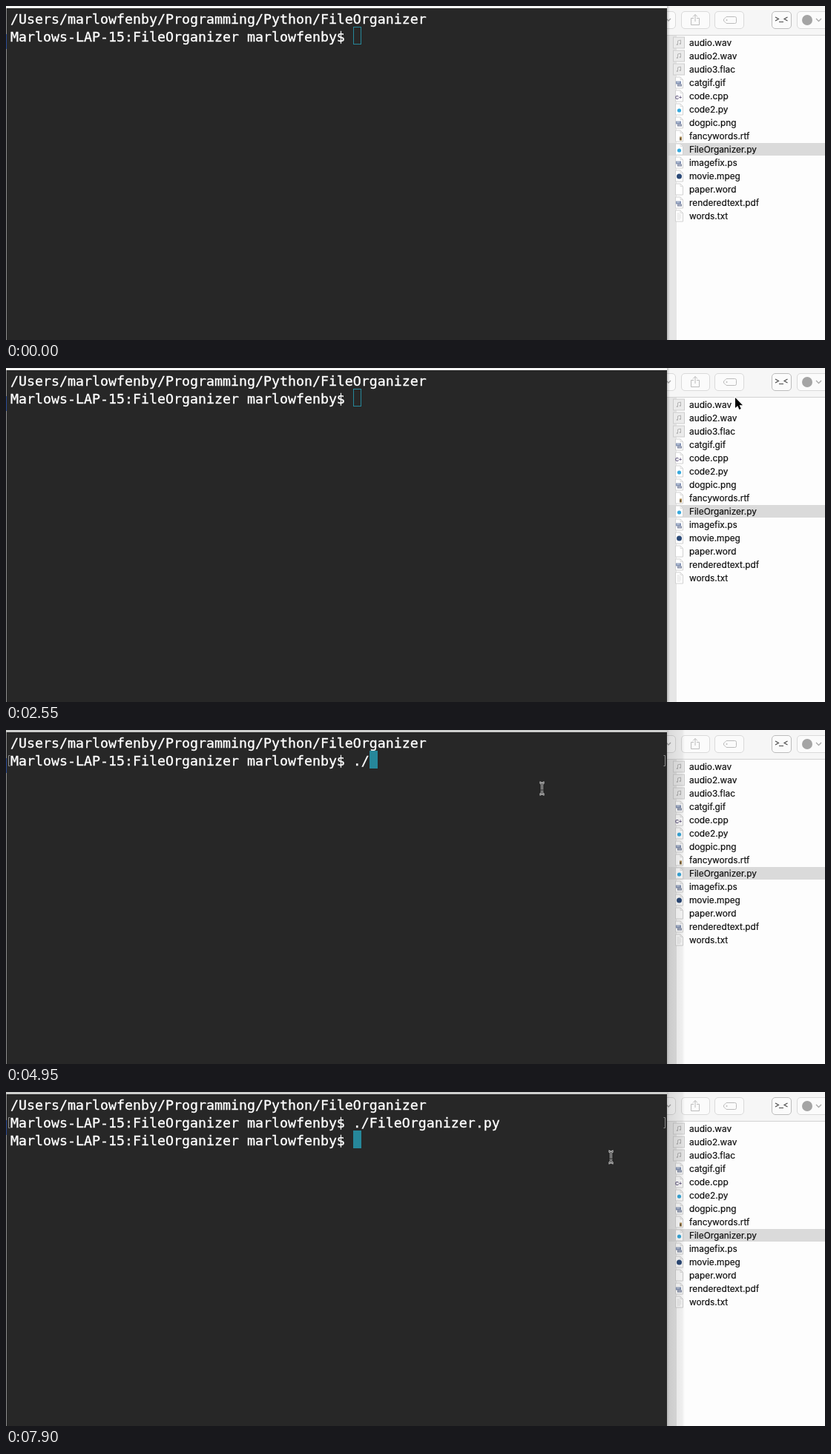
An HTML page with a canvas that plays this animation: 1104x451 px, repeating every 8000 ms.

```html
<!DOCTYPE html>
<html lang="en">
<head>
<meta charset="utf-8">
<title>Terminal and file list</title>
<style>
html, body { margin: 0; width: 1104px; height: 451px; overflow: hidden; }
canvas { display: block; }
</style>
</head>
<body>
<canvas id="stage" width="1104" height="451"></canvas>
<script>
const ctx = document.getElementById('stage').getContext('2d');
const LOOP = 8000;
const TEAL = '#26879a';
const CELL = 11, LINE = 24, LEFT = 6, TOP = 4;
const PATH_LINE = '/Users/marlowfenby/Programming/Python/FileOrganizer';
const PROMPT = 'Marlows-LAP-15:FileOrganizer marlowfenby$ ';
const COMMAND = './FileOrganizer.py ';

const FILES = [
  ['audio.wav', 'audio'], ['audio2.wav', 'audio'], ['audio3.flac', 'audio'],
  ['catgif.gif', 'image'], ['code.cpp', 'cpp'], ['code2.py', 'python'],
  ['dogpic.png', 'image'], ['fancywords.rtf', 'rich'], ['FileOrganizer.py', 'python'],
  ['imagefix.ps', 'image'], ['movie.mpeg', 'movie'], ['paper.word', 'blank'],
  ['renderedtext.pdf', 'image'], ['words.txt', 'text']
];

// The mouse is sampled at a fixed step: it circles the list, then clicks the terminal.
const CIRCLING = { start: 150, step: 150, points: [
  [814, 432], [822, 385], [840, 345], [866, 290], [910, 225], [965, 130], [1010, 36],
  [975, 23], [920, 60], [896, 160], [935, 255], [1010, 211], [1025, 185], [1022, 130],
  [1015, 85], [1003, 55], [983, 40], [950, 75], [933, 165], [960, 256], [1022, 230],
  [1000, 130], [850, 90], [722, 79]
] };
const POINTING = { start: 5980, step: 147.7, points: [
  [767, 40], [840, 11], [935, 30], [1004, 90], [1002, 170], [1005, 190], [985, 160],
  [982, 101], [870, 79], [815, 88]
] };
const CLICK = 3600;
const RETURN = 7750, NEXT_PROMPT = 7900;
const TYPING = [[4800, 1], [4950, 2], [5095, 3], [5240, 4], [5390, COMMAND.length]];

function rect(x, y, w, h, color) {
  ctx.fillStyle = color;
  ctx.fillRect(x, y, w, h);
}

// A hairline stroke gives the text its slightly heavy weight.
function text(str, x, y, font, color, weight = 0) {
  ctx.font = font;
  ctx.fillStyle = ctx.strokeStyle = color;
  ctx.fillText(str, x, y);
  if (!weight) return;
  ctx.lineWidth = weight;
  ctx.strokeText(str, x, y);
}

function disc(x, y, r, color) {
  ctx.fillStyle = color;
  ctx.beginPath();
  ctx.arc(x, y, r, 0, Math.PI * 2);
  ctx.fill();
}

function line(d, color, width = 1) {
  ctx.strokeStyle = color;
  ctx.lineWidth = width;
  ctx.stroke(new Path2D(d));
}

function at(x, y, draw) {
  ctx.save();
  ctx.translate(x, y);
  draw();
  ctx.restore();
}

function button(x, w, border) {
  ctx.beginPath();
  ctx.roundRect(x + .5, 7.5, w, 23, 4.5);
  ctx.fillStyle = '#fbfbfb';
  ctx.fill();
  ctx.strokeStyle = border;
  ctx.lineWidth = 1;
  ctx.stroke();
}

function toolbar() {
  rect(891, 0, 213, 39, '#f6f6f6');
  rect(891, 39, 213, 1, '#d2d2d2');
  button(870, 32, '#dadada');
  button(910, 38, '#dadada');
  button(955, 39, '#dadada');
  button(1032, 26, '#bcbcbc');
  button(1066, 60, '#dadada');
  line('M890 17l3 3 3-3M1092 17l3.5 3.5 3.5-3.5', '#a8a8a8', 1.3);
  line('M927 16.5H923.5V25.5H934.5V16.5H931M929 21V11.5M926 14.5l3-3 3 3', '#bcbcbc');
  line('M971 14.5H982.5Q984.5 14.5 984.5 16.5V21.5Q984.5 23.5 982.5 23.5H971L967.5 20V18Z', '#bcbcbc');
  disc(971.5, 19, 1, '#bcbcbc');
  line('M1037 15l4.5 2.5-4.5 2.5M1053.5 15l-4.5 2.5 4.5 2.5M1042 21.5h6', '#4a4a4a', 1.1);
  disc(1080, 19, 7, '#a4a4a4');
}

function page() {
  const shape = new Path2D('M-4.5-7.5H2L5.5-4V7.5H-4.5Z');
  ctx.fillStyle = '#fff';
  ctx.fill(shape);
  ctx.strokeStyle = '#d2d2d2';
  ctx.lineWidth = 1;
  ctx.stroke(shape);
  line('M2-7.5V-4H5.5', '#dcdcdc');
}

const ICONS = {
  audio() {
    rect(-8, -8, 16, 16, '#cdcdcd');
    rect(-7, -7, 14, 14, '#ebebeb');
    line('M-1.5 2.5V-2.5L2.5-3.5V1.5', '#b4b4b4');
    disc(-2.2, 2.5, 1.1, '#b4b4b4');
    disc(1.8, 1.5, 1.1, '#b4b4b4');
  },
  image() {
    page();
    rect(-4, -2, 7, 4, '#8493b4');
    rect(-3, -1, 4, 1, '#d3dbe8');
    rect(-2, 2, 6, 3, '#7d86a0');
    rect(-1, 3, 4, 1, '#c3c9d6');
  },
  cpp() {
    page();
    text('C+', -5, 4.5, 'bold 7px "Liberation Sans", sans-serif', '#5a4f78');
  },
  python() {
    page();
    disc(.5, 1.5, 2.6, '#38a9dc');
  },
  rich() {
    page();
    rect(1, 1, 3, 5, '#a9874e');
    rect(1, 3, 2, 2, '#5d5549');
  },
  movie() {
    page();
    disc(.5, .5, 3.5, '#2c4a78');
  },
  blank: page,
  text() {
    page();
    line('M-2.5-3.5H1M-2.5-1.5H3.5M-2.5.5H3.5M-2.5 2.5H3.5M-2.5 4.5H2', '#e0e0e0');
  }
};

function windowShadow(active) {
  const reach = active ? 24 : 4;
  const shadow = ctx.createLinearGradient(891, 0, 891 + reach, 0);
  shadow.addColorStop(0, 'rgba(0,0,0,.2)');
  if (active) {
    shadow.addColorStop(.15, 'rgba(0,0,0,.11)');
    shadow.addColorStop(.85, 'rgba(0,0,0,.06)');
  }
  shadow.addColorStop(1, 'rgba(0,0,0,0)');
  rect(891, 0, reach, 451, shadow);
}

function fileList() {
  rect(891, 40, 213, 411, '#fdfdfd');
  rect(891, 40, 13, 411, '#e6e6e6');
  rect(893, 185, 211, 17, '#dadada');
  FILES.forEach(([name, icon], i) => {
    at(907, 49.5 + 18 * i, ICONS[icon]);
    text(name, 921, 54 + 18 * i, '11.85px Inter, sans-serif', '#111', .2);
  });
}

function row(str, n) {
  text(str, LEFT, TOP + LINE * n + 20, '18.27px "DejaVu Sans Mono", monospace', '#fff', .35);
}

function caret(col, n, solid) {
  const x = LEFT + CELL * col, y = TOP + LINE * n;
  if (solid) return rect(x, y, CELL, LINE, TEAL);
  ctx.strokeStyle = TEAL;
  ctx.lineWidth = 1;
  ctx.strokeRect(x + .5, y + .5, CELL - 1, LINE - 1);
}

function terminal(t, active) {
  rect(0, 0, 891, 3, active ? '#cfd0ce' : '#f5f6f5');
  rect(0, 3, 1, 448, '#8d8d8d');
  rect(0, 38, 1, 20, '#2d4c96');
  rect(1, 3, 890, 448, '#272727');

  const typed = TYPING.reduce((n, [time, count]) => t >= time ? count : n, 0);
  row(PATH_LINE, 0);
  row(PROMPT + COMMAND.slice(0, typed), 1);
  if (typed) line('M5.5 34.5H3.5V48.5H5.5M886.5 34.5H888.5V48.5H886.5', '#8c8c8c');

  if (t >= NEXT_PROMPT) row(PROMPT, 2);
  if (t < RETURN) caret(PROMPT.length + typed, 1, active);
  else caret(t < NEXT_PROMPT ? 0 : PROMPT.length, 2, active);
}

function arrow() {
  const shape = new Path2D('M0 0V14L3.2 11 5.4 16 7.8 15 5.6 10.2H10Z');
  ctx.lineJoin = 'round';
  ctx.strokeStyle = '#fff';
  ctx.lineWidth = 2;
  ctx.stroke(shape);
  ctx.fillStyle = '#000';
  ctx.fill(shape);
}

function beam() {
  const d = 'M-3.5-8H-2L0-6 2-8H3.5M0-6V6M-3.5 8H-2L0 6 2 8H3.5M-1.5 2H1.5';
  line(d, '#e4e4e4', 2.6);
  line(d, '#1c1c1c', 1);
}

function mouse(t, active) {
  const { start, step, points } = t < POINTING.start ? CIRCLING : POINTING;
  if (t < start) return;
  const i = Math.min(points.length - 1, Math.floor((t - start) / step + .01));
  const [x, y] = points[i];
  if (active && x < 891) at(x + .5, y, beam);
  else at(x, y, arrow);
}

function draw(now) {
  const t = now % LOOP, active = t >= CLICK;
  toolbar();
  fileList();
  windowShadow(active);
  terminal(t, active);
  mouse(t, active);
  requestAnimationFrame(draw);
}
requestAnimationFrame(draw);
</script>
</body>
</html>
```
